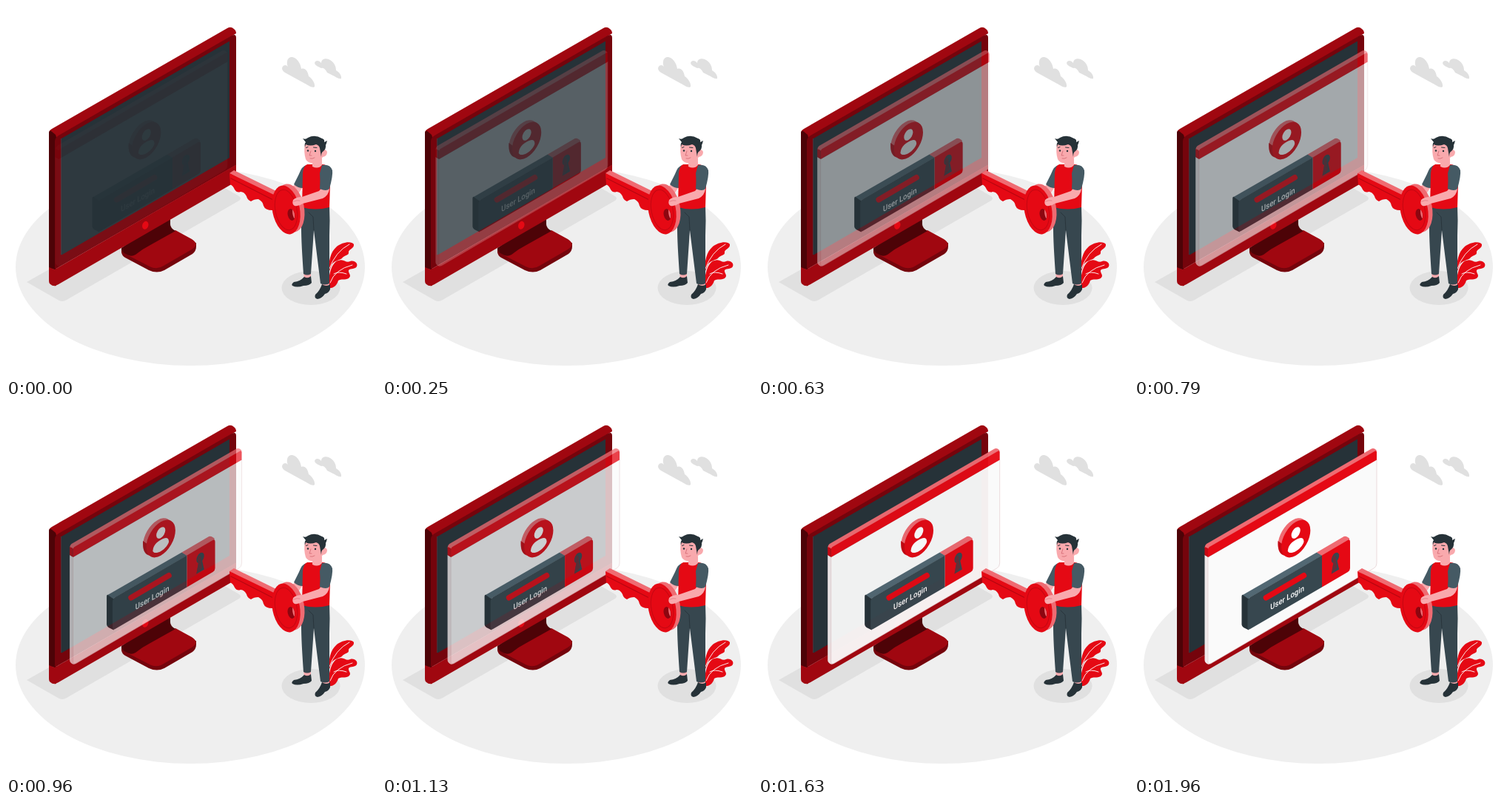
Recreate the animation shown at these times as an HTML page. Size 500 px wide and 500 px high, loop 2 s.

```html
<!DOCTYPE html>
<html lang="en">
<head>
<meta charset="utf-8">
<title>User login</title>
<style>
  html, body { margin: 0; width: 100%; height: 100%; overflow: hidden; background: #fff; }
  svg { display: block; width: 100vw; height: 100vh; }
  text { font: 500 11px Roboto, Arial, sans-serif; }
  .red { fill: #e50914; }
  .pink { fill: #ef6b72; }
  .skin { fill: #f9a9ad; }
  .slate { fill: #37474f; }
  .ink { fill: #263238; }
  .grey { fill: #e0e0e0; }
  .case { fill: #a00710; }
  .dim { fill: #75040c; }
  .deep { fill: #4d0307; }
  .line { fill: none; stroke-linecap: round; stroke-linejoin: round; }
</style>
</head>
<body>
<svg viewBox="0 0 500 500">
  <!-- floor and shadows -->
  <ellipse cx="249" cy="352.500" rx="236" ry="133.500" fill="#efefef"/>
  <path class="grey" d="M28 373 L70 397 Q76 401 82 397 L315 263 Q319 260 315 257 L275 234Z"/>
  <ellipse class="grey" cx="412" cy="381" rx="39.500" ry="23"/>

  <!-- clouds -->
  <path class="grey" d="M373 84C374 79 379 79 381 82C378 75 381 68 387 69C393 70 398 77 399 85C404 83 408 88 409 95C414 98 418 105 417 109C415 111 411 109 408 107L377 90C374 88 373 86 373 84Z"/>
  <path class="grey" d="M417 77C418 73 423 73 426 77C426 72 431 70 436 72C443 75 446 81 446 87C450 89 454 94 453 98C451 99 447 97 444 95L434 90C432 86 429 83 426 84L420 81Q417 79 417 77Z"/>

  <!-- stand -->
  <path class="dim" d="M156 327V333Q157 338 161 340L193 357Q204 362 214 357L252 335Q257 331 257 325V320L200 310Z"/>
  <path class="case" d="M229 303L251 315Q262 322 251 329L213 351Q204 357 194 352L165 337L190 322Z"/>
  <path class="deep" d="M156 327L195 300L222 285V295Q222 300 229 304L195 323Q185 328 175 336Q170 339 166 337L160 334Q156 331 156 327Z"/>

  <!-- monitor -->
  <path class="case" d="M58 172Q58 168 62 166L299 30Q304 27 308 31Q311 33 311 37L72 182Z"/>
  <path class="deep" d="M58 172Q58 168 61 169L67 174Q68 176 68 180V357L58 354Z"/>
  <path class="case" d="M58 353L68 357V378Q63 379 60 376Q58 375 58 371Z"/>
  <path class="dim" d="M66 183Q66 178 71 175L305 40Q311 37 311 43V215L66 356Z"/>
  <path class="case" d="M66 356L311 214.500V234Q311 237 308 239L71 376Q66 379 66 375Z"/>
  <path class="ink" d="M75 179L302 47.500V205L75 336.500Z"/>
  <path d="M74.500 179V336" stroke="#4a3038" stroke-width="1.200"/>
  <ellipse class="red" cx="188.300" cy="296.300" rx="4.100" ry="5.600" transform="rotate(18 188.300 296.300)"/>

  <!-- sliding login window, drawn at its resting place -->
  <g id="win">
    <path fill="#f0e9ea" d="M95.500 204L101 207V352Q95.500 350 95.500 346Z"/>
    <path fill="#fafafa" stroke="#e3cccd" stroke-width=".7" d="M100 207L328 75V215Q328 220 324 222L105 350Q100 353 100 349Z"/>
    <path class="pink" d="M95.500 194Q95.500 191 98 189L320 61Q323 59 326 61L328 63L100 196Z"/>
    <path fill="#c90812" d="M95.500 193L100 195V207L95.500 204Z"/>
    <path class="red" d="M100 197Q100 194 103 192.500L325 64Q328 62 328 65V75.500L100 207Z"/>

    <!-- avatar -->
    <g transform="matrix(.866 -.5 0 1 214.200 179.600)"><circle r="22.700" class="pink"/></g>
    <path fill="#c50812" d="M194.500 185Q194 202 202 204L207 206V194Z"/>
    <g transform="matrix(.866 -.5 0 1 218.700 182)">
      <circle r="22.700" class="red"/>
      <circle cy="-8" r="7" fill="#fff"/>
      <path fill="#fff" d="M-12.500 10C-12 3 -6 1.500 0 1.500C6 1.500 12 3 12.500 10C12.500 13 7 17 0 17C-7 17 -12.500 13 -12.500 10Z"/>
    </g>

    <!-- input box -->
    <path class="ink" d="M145.500 260Q145.500 257 148 258L155 262V305.500L148 302Q145.500 300 145.500 298Z"/>
    <path fill="#526873" d="M147 258L247 200.500L254.500 204.500L154 263Z"/>
    <path class="pink" d="M247 200.500L282 180Q285 178 288 179.500L291 181.500L291 184L254 205Z"/>
    <path class="slate" d="M153.500 267Q153.500 263 157 261L254 204.500V247.500L157 304Q153.500 306 153.500 302Z"/>
    <path class="red" d="M254 204.500L288 184.500Q292 182 292 186V222Q292 225 289 227L254 247.500Z"/>
    <path class="line" stroke="#e50914" stroke-width="7.500" d="M178.500 261.800L229.500 231.800"/>
    <text transform="matrix(.866 -.5 0 1 184.300 278.500)" fill="#fff">User Login</text>
    <g transform="matrix(.866 -.5 0 1 272 214.500)">
      <path class="slate" d="M-3 -1A6 6.500 0 1 1 3 -1L6 12H-6Z"/>
      <path fill="#7b2730" d="M-4 -3A5 6 0 0 1 -2 -11Q2 -8 1 -2L3 8L-6 12L-3 -1Z" opacity=".65"/>
    </g>
  </g>

  <!-- plant -->
  <path class="red" d="M436 361C436 344 438 333 447 325C454 319 467 317 470 322C471 328 462 329 463 333C464 337 456 337 454 341C450 344 443 344 440 350Z"/>
  <path class="red" d="M436 381C435 365 440 346 449 344C457 341 459 348 465 345C471 343 476 348 474 352C472 356 466 354 463 357C462 361 468 364 463 368C458 371 453 368 449 371C447 378 442 382 436 381Z"/>
  <path class="line" stroke="#fff" stroke-width=".9" d="M437 355Q445 332 464 322M438 374Q444 356 468 350M443 362Q449 358 460 362"/>

  <!-- far arm -->
  <path class="skin" d="M392 240L401 244Q397 253 390 257L379 259L381 249Z"/>
  <path fill="#455a64" d="M406 215Q400 216 396 227L389 241Q394 246 401 246L408 230Z"/>

  <!-- legs and shoes -->
  <path class="skin" d="M402 357H412V370H403ZM426 370H437V381H428Z"/>
  <path class="ink" d="M403 366Q408 369 412 365L413 374Q410 378 402 378Q393 381 387 378Q385 376 389 373Q398 372 403 366Z"/>
  <path class="ink" d="M427 376Q433 380 438 376L438 383Q436 388 431 389Q427 395 421 396Q416 395 418 390Q424 385 427 376Z"/>
  <path class="slate" d="M399 270H437Q438 290 437 310L437 375Q431 378 425 375L420 335L416 303L412 362Q407 365 402 362Q399 320 399 300Z"/>
  <path class="line" stroke="#263238" stroke-width=".8" d="M416 303L415 285L409 279"/>

  <!-- torso and head -->
  <path class="red" d="M407 214Q402 216 401 226L400 272Q418 277 437 272L438 240L437 219Q433 214 427 214Z"/>
  <path class="skin" d="M414 206H427V215Q422 221 414 217Z"/>
  <path class="skin" d="M404 186Q402 198 405 207Q408 213 416 212Q424 211 428 204Q434 203 434 197Q432 192 427 195L426 184Z"/>
  <path class="ink" d="M404 191Q403 186 405 184L401 179Q405 181 408 178Q417 173 427 179Q431 180 430 184L434 182Q433 186 432 188Q433 193 428 197Q426 198 426 204L424 192Q423 188 419 187Q411 190 405 187Z"/>
  <path class="line" stroke="#263238" stroke-width="1" d="M405.500 191.500L408 190.500M415.500 191L420 191.500"/>
  <circle class="ink" cx="408" cy="195.500" r="1.200"/>
  <circle class="ink" cx="418" cy="196" r="1.200"/>
  <path class="line" stroke="#d66f78" stroke-width=".9" d="M412 196L410 202L413 202M411 206Q414 207 417 205"/>

  <!-- key -->
  <path class="pink" d="M302 226L308 222L367 251L362 259Z"/>
  <path class="red" d="M302 226L366 257V279L360 276Q350 276 348 270Q347 264 341 261Q335 261 331 264Q326 262 325 257Q322 251 317 251Q312 253 309 248Q307 243 303 241Z"/>
  <path class="line" stroke="#b70610" stroke-width="1.200" d="M304 233L361 262"/>
  <g transform="translate(384.500 273) rotate(-11)"><ellipse class="pink" rx="18.300" ry="33"/></g>
  <g transform="translate(378.500 275.500) rotate(-11)">
    <ellipse class="red" rx="18.500" ry="33.300"/>
    <ellipse class="line" rx="14.500" ry="27.500" stroke="#c40712" stroke-width="1"/>
  </g>
  <ellipse cx="385.500" cy="282" rx="4.800" ry="8" fill="#8d0610" transform="rotate(-13 385.500 282)"/>
  <path class="pink" d="M387 275Q391 279 390 287Q387 285 387 275Z"/>

  <!-- near arm -->
  <path class="skin" d="M428 244L437 247Q436 256 428 260L401 267Q396 271 390 270Q386 268 388 262Q392 258 400 258L423 250Z"/>
  <path fill="#455a64" d="M427 215Q438 213 441 222Q442 229 437 247Q433 251 424 247Q425 236 424 226Z"/>
  <path class="line" stroke="#df7c83" stroke-width=".8" d="M389 264Q393 262 397 263"/>
</svg>
<script>
  const LOOP = 2000, FPS = 24, STEPS = 48, TRAVEL = 30;
  const win = document.getElementById("win");

  // cubic-bezier(0, 0, .58, 1)
  function easeOut(x) {
    let lo = 0, hi = 1;
    for (let i = 0; i < 24; i++) {
      const s = (lo + hi) / 2;
      if (1.74 * s * s * (1 - s) + s ** 3 < x) lo = s; else hi = s;
    }
    return lo * lo * (3 - 2 * lo);
  }

  function draw() {
    const time = performance.now() % LOOP;
    const step = Math.floor(time * FPS / 1000 + 0.1);
    const shown = easeOut(Math.min(1, (step + 1) / STEPS));
    win.setAttribute("transform", `translate(${(-TRAVEL * (1 - shown)).toFixed(2)} 0)`);
    win.setAttribute("opacity", shown.toFixed(3));
    requestAnimationFrame(draw);
  }
  draw();
</script>
</body>
</html>
```
